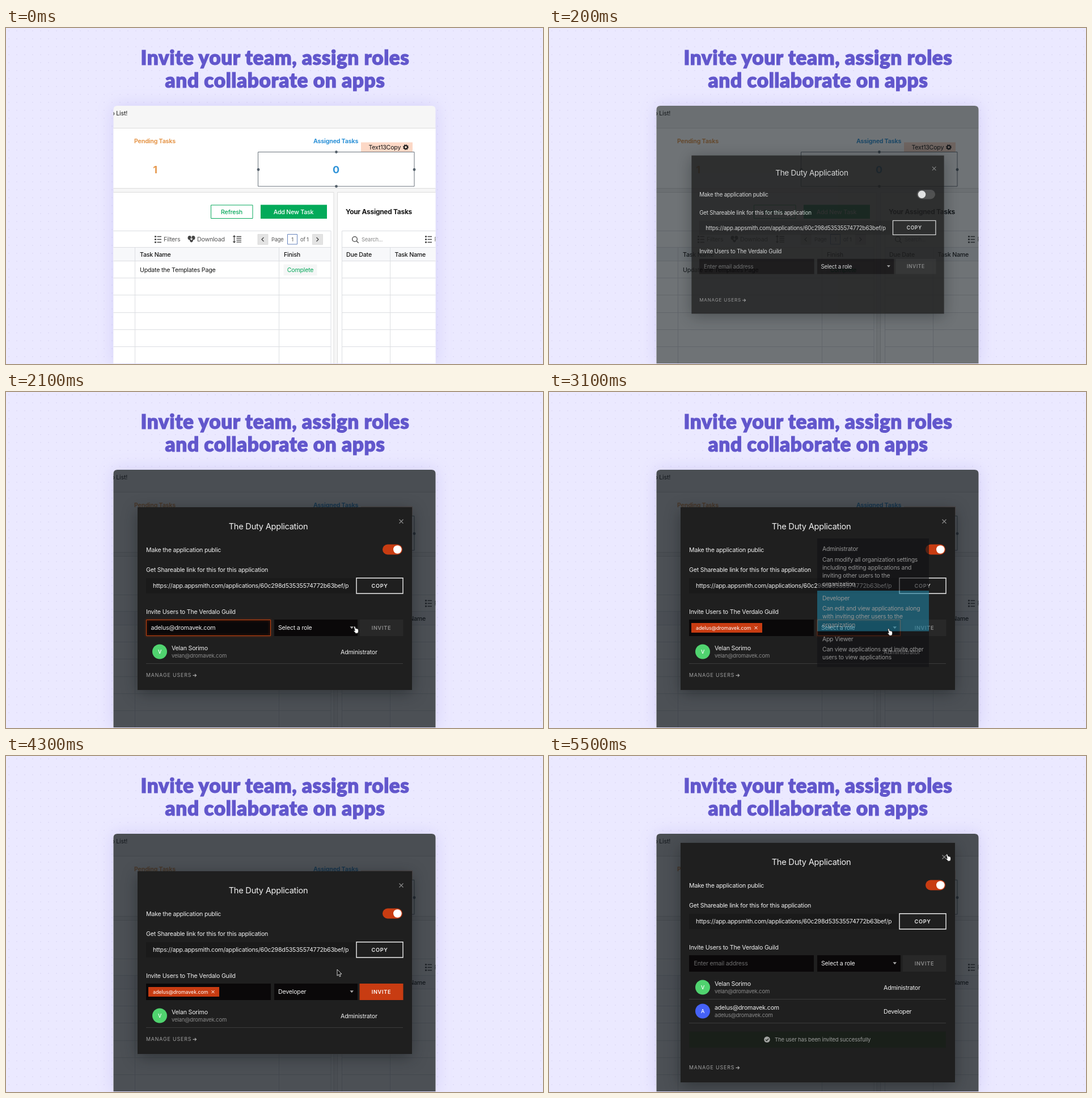
Animation of 947x592 px, one loop 6.5 s. Source, as an HTML page:

```html
<!DOCTYPE html>
<html lang="en">
<head>
<meta charset="utf-8">
<title>Invite your team</title>
<style>
  html, body { margin: 0; width: 100%; height: 100%; overflow: hidden; background: #ebe9ff; }
  svg { display: block; width: 947px; height: 592px; }
  text { font: 10.65px Inter, "Open Sans", sans-serif; letter-spacing: -.02em; fill: #161616; white-space: pre; }
  .headline { font: 900 35.2px Lato, Inter, sans-serif; letter-spacing: .015em; fill: #6257cc; stroke: #6257cc; stroke-width: 1.1; }
  .mid { text-anchor: middle; }
  .medium { font-weight: 500; }
  .semi { font-weight: 700; }
  .count { font-size: 18px; font-weight: 700; }
  .tool { fill: #555; }
  .small { font-size: 9.3px; }
  .line { fill: none; stroke: #dcdee2; }
  .icon { fill: none; stroke: #444; stroke-width: 1.3; }
  .panel { fill: #fff; stroke: #dcdcdc; }
  #dialog text { fill: #f0f0f0; }
  #dialog .title { font-size: 14.7px; }
  #dialog .mute { fill: #8b8b8b; font-size: 9.6px; }
  #dialog .hint { fill: #6c6c6c; }
  #dialog .caps { font-size: 9.2px; font-weight: 600; letter-spacing: .7px; }
  #dialog .chip { font-size: 8.8px; letter-spacing: 0; fill: #fff; }
  #dialog .avatar { font-size: 9px; font-weight: 500; fill: #fff; text-anchor: middle; }
  #dialog .manage { font-size: 8.8px; letter-spacing: .9px; fill: #a0a0a0; }
  #dialog #menu text { fill: #ddd; font-size: 10.4px; }
  .sheet { fill: #1f1f1f; filter: drop-shadow(0 6px 14px rgba(10, 14, 18, .4)); }
  .well { fill: #0a0809; }
  .rule { stroke: #3c3c3c; }
  .orange { fill: #c83c12; }
  .focus { fill: none; stroke: #c2420f; filter: drop-shadow(0 0 2px #a8380f); }
</style>
</head>
<body>
<svg viewBox="0 0 947 592">
  <defs>
    <pattern id="dots" width="14" height="14" patternUnits="userSpaceOnUse">
      <circle cx="5" cy="5" r=".9" fill="#dedaf7"/>
    </pattern>
    <path id="card" d="M189.500 591V144q0-7 7-7h554q7 0 7 7v447z"/>
    <clipPath id="window"><use href="#card"/></clipPath>
    <clipPath id="link"><path d="M247 328h360v28H247z"/></clipPath>
    <g id="filters">
      <path class="icon" d="M4.500 0H12M4.500 5H12M4.500 10H12"/>
      <path d="M0-1.200h3v2.400H0zM0 3.800h3v2.400H0zM0 8.800h3v2.400H0z" fill="#444"/>
    </g>
  </defs>

  <rect width="947" height="592" fill="#ebe9ff"/>
  <rect width="947" height="592" fill="url(#dots)"/>
  <text class="headline mid" x="474.500" y="64.500">Invite your team, assign roles</text>
  <text class="headline mid" x="474.500" y="105">and collaborate on apps</text>
  <use href="#card" fill="#f6f6f6" style="filter: drop-shadow(0 0 14px rgba(120, 105, 225, .2))"/>

  <g clip-path="url(#window)">
    <!-- Page behind the dialog -->
    <text x="214" y="154" text-anchor="end">To Do List!</text>
    <path class="panel" d="M180 176.500h590v106H180z"/>
    <path class="panel" d="M180 289.500h398v310H180zM584.500 289.500h190v310h-190z"/>

    <text class="semi" x="226" y="203" style="fill:#e6994f">Pending Tasks</text>
    <text class="count mid" x="263" y="255.500" style="fill:#e6994f">1</text>
    <text class="semi" x="542" y="203" style="fill:#2f93d8">Assigned Tasks</text>
    <text class="count mid" x="582" y="255.500" style="fill:#2f93d8">0</text>
    <path d="M626 201.500h91v17h-91z" fill="#fcd8c6"/>
    <text x="639.500" y="213.700">Text13Copy</text>
    <circle cx="705" cy="210" r="2.900" fill="none" stroke="#111" stroke-width="1.900"/>
    <circle cx="705" cy="210" r="4.300" fill="none" stroke="#111" stroke-width="1.200" stroke-dasharray="1.800 1.577"/>
    <path d="M444.500 218.500h275.500v60.500H444.500z" fill="none" stroke="#6a737c"/>
    <g fill="#56616b">
      <circle cx="582.500" cy="218.500" r="2.400"/><circle cx="582.500" cy="279" r="2.400"/>
      <circle cx="445" cy="249.500" r="2.400"/><circle cx="720" cy="249.500" r="2.400"/>
    </g>

    <path d="M361.500 312h73.500v23.500h-73.500z" fill="#fff" stroke="#08a95c"/>
    <text class="medium mid" x="398" y="327.700" style="fill:#08a95c">Refresh</text>
    <path d="M449 311.500h117v24.500H449z" fill="#03aa5a"/>
    <text class="medium mid" x="507" y="327.700" style="fill:#fff">Add New Task</text>
    <text class="semi" x="599" y="328.300" style="font-size:11.900px">Your Assigned Tasks</text>

    <path d="M189 386.500h384v24H189zM592 386.500h166v24H592z" fill="#f7f8fa"/>
    <path class="line" d="M180 357.500h393v240M592.500 600V357.500h170M180 386.500h393M592 386.500h170"/>
    <path class="line" d="M180 410.500h393m19 0h170M180 440.500h393m19 0h170M180 470.500h393m19 0h170M180 501.500h393m19 0h170M180 531.500h393m19 0h170M180 561.500h393m19 0h170"/>
    <path class="line" d="M227.500 386v210M481.500 386v210M677.500 386v210"/>

    <use href="#filters" x="262" y="367.500"/>
    <text class="tool" x="278" y="376">Filters</text>
    <path d="M320.500 370q0-4 3.500-4 2.500 0 2.500 2v3h-2l2.500 3 2.500-3h-2v-3q0-2 2.500-2 3.500 0 3.500 4 0 3-3.500 3.500-.5 4-3 4t-3-4q-3.500-.5-3.500-3.500z" fill="#444"/>
    <text class="tool" x="337" y="376">Download</text>
    <path class="icon" d="M406.500 367.500h8.500m-8.500 3.200h8.500m-8.500 3.200h8.500m-8.500 3.200h8.500M402.500 366v12m-2-10 2-2 2 2m-4 8 2 2 2-2" stroke-width="1.100"/>
    <path d="M444 363.500h18v18h-18zM540.500 363.500h18v18h-18z" fill="#e3e3e3" stroke="#d2d2d2" stroke-width=".6"/>
    <path class="icon" d="m454.500 369-3.500 3.500 3.500 3.500M547.500 369l3.500 3.500-3.500 3.500"/>
    <text class="tool small" x="468" y="375.700">Page</text>
    <path d="M496.500 363.500h17v17.500h-17z" fill="#fff" stroke="#6684bd"/>
    <text class="tool small mid" x="505" y="375.700">1</text>
    <text class="tool small" x="519" y="375.700">of 1</text>
    <circle class="icon" cx="615" cy="372" r="4.300"/><path class="icon" d="m618.200 375.200 3.500 3.500"/>
    <text class="small" x="627" y="376" style="fill:#888">Search...</text>
    <use href="#filters" x="739" y="367.500"/>
    <text class="tool" x="755.500" y="376">Filters</text>

    <text class="medium" x="236" y="402.600">Task Name</text>
    <text class="medium" x="490" y="402.600">Finish</text>
    <text class="medium" x="600" y="402.600">Due Date</text>
    <text class="medium" x="685.500" y="402.600">Task Name</text>
    <text x="236" y="430">Update the Templates Page</text>
    <path d="M489.500 416.500h59v19.500h-59z" fill="#f5f6f6"/>
    <text class="mid" x="519" y="430" style="fill:#08a95c">Complete</text>

    <rect id="backdrop" x="189" y="136" width="570" height="456" fill="rgb(16 22 28 / .75)"/>

    <g id="dialog">
      <rect id="sheet" class="sheet" x="232" y="203" width="484"/>
      <text class="title mid" x="462.500" y="241.500">The Duty Application</text>
      <path d="m693.500 224.500 7 7m0-7-7 7" stroke="#8a8a8a" stroke-width="1.200"/>
      <text x="247" y="281.800">Make the application public</text>
      <rect id="toggle" x="664" y="268.500" width="35" height="18" rx="9"/>
      <circle id="knob" cy="277.500" r="7.300" fill="#fff"/>

      <text x="247" y="316.500">Get Shareable link for this for this application</text>
      <path d="M247 328h370v27H247z" fill="#1a1a1a"/>
      <g clip-path="url(#link)">
        <text x="259" y="345.300">https://app.appsmith.com/applications/60c298d53535574772b63bef/p</text>
      </g>
      <path d="M618 327.700h82v27.300h-82z" fill="#1f1f1f" stroke="#eee" stroke-width="1.400"/>
      <text class="caps mid" x="659" y="344.500">COPY</text>

      <text x="247" y="390.600">Invite Users to The Verdalo Guild</text>
      <path class="well" d="M247 401h220v29H247zM473 401h147v29H473z"/>
      <path id="focus" class="focus" d="M247.500 401.500h219v28h-219z"/>
      <text id="hint" class="hint" x="255.500" y="419.300">Enter email address</text>
      <text id="typed" x="255.500" y="419.300"></text>
      <rect id="caret" y="409" width="1" height="13" fill="#eee"/>
      <g id="chip">
        <path class="orange" d="M251 407h125v17H251z"/>
        <text class="chip" x="259" y="418.600">adelus@dromavek.com</text>
        <path d="m362.500 413 5 5m0-5-5 5" stroke="#fff"/>
      </g>
      <path id="roleFocus" class="focus" d="M473.500 401.500h146v28h-146z"/>
      <text id="role" x="480" y="419.300"></text>
      <path d="M606.500 413.300h6.500l-3.250 4z" fill="#aaa"/>
      <path id="inviteBox" d="M623.500 401h77v29h-77z"/>
      <text id="invite" class="caps mid" x="662" y="418.700">INVITE</text>

      <g id="owner">
        <circle cx="271" cy="457.500" r="13" fill="#50d36f"/>
        <text class="avatar" x="271" y="460.800">V</text>
        <text x="292" y="455">Velan Sorimo</text>
        <text class="mute" x="292" y="468.300">velan@dromavek.com</text>
        <text x="590" y="461.800">Administrator</text>
        <path class="rule" d="M247 478.500h453"/>
      </g>
      <g id="guest">
        <circle cx="271" cy="499.500" r="13" fill="#4562f7"/>
        <text class="avatar" x="271" y="502.800">A</text>
        <text x="292" y="496.500">adelus@dromavek.com</text>
        <text class="mute" x="292" y="510">adelus@dromavek.com</text>
        <text x="590" y="503.500">Developer</text>
        <path class="rule" d="M247 520.500h453"/>
      </g>
      <g id="success">
        <path d="M247 535.500h453v28.500H247z" fill="#191f19"/>
        <circle cx="384.500" cy="549.500" r="5.300" fill="#a3a5a3"/>
        <path d="m382 549.700 1.900 1.900 3.300-3.700" fill="none" stroke="#191f19" stroke-width="1.300"/>
        <text class="mute" x="398" y="553.200" style="fill:#9b9d9b">The user has been invited successfully</text>
      </g>
      <g id="manage">
        <text class="manage" x="247" y="502.300">MANAGE USERS</text>
        <path d="M329.500 499.300h6m-2.500-2.500 2.500 2.500-2.500 2.500" fill="none" stroke="#a8a8a8" stroke-width="1.200"/>
      </g>

      <g id="menu">
        <path d="M473 258h197v226.500H473z" fill="#111114"/>
        <path d="M473 350h197v71.500H473z" fill="#1f7d9b"/>
        <text x="482" y="280.200">Administrator</text>
        <text x="482" y="298.600">Can modify all organization settings<tspan x="482" dy="14.400">including editing applications and</tspan><tspan x="482" dy="14.400">inviting other users to the</tspan><tspan x="482" dy="14.400">organization</tspan></text>
        <text x="482" y="366.700">Developer</text>
        <text x="482" y="384.800">Can edit and view applications along<tspan x="482" dy="14.400">with inviting other users to the</tspan><tspan x="482" dy="14.400">organization</tspan></text>
        <text x="482" y="438.600">App Viewer</text>
        <text x="482" y="456.700">Can view applications and invite other<tspan x="482" dy="14.400">users to view applications</tspan></text>
      </g>
    </g>
  </g>

  <path id="hand" d="M-3-6q1.300-.6 1.900.8l.9 3q.8-.6 1.500.2.900-.5 1.500.4 1-.2 1.300.8l.5 2.500q.2 1.500-.6 2.800l.1 1.300-4.600.6-.6-1.300q-1.600-1.200-2.900-3 .1-1.100 1.400-.6l.9.5-1.700-6.600q-.3-1 .4-1.400z" fill="#fff" stroke="#111" stroke-width=".8"/>
  <path id="arrow" d="M0 0V11.200L2.600 8.800 4.400 12.800 6.200 12 4.500 8.100H8z" fill="#111" stroke="#fff" stroke-width=".8"/>
</svg>

<script>
  const LOOP = 6500;
  const EMAIL = "adelus@dromavek.com";
  const BASE = 322; // dialog height the markup is laid out for

  // Each track is a list of [ms, value...]; a value holds until the next entry.
  const tracks = {
    backdrop: [[0, 0], [100, .19], [200, .8], [300, 1]],
    dialog: [[0, 0, 1], [100, .15, .558], [200, .8, .92], [300, 1, 1]],
    height: [[0, 303], [300, BASE], [4700, 364], [4800, 422]],
    knob: [[0, 673.5], [600, 682], [700, 690.3]],
    letters: [[0, 0], [900, 1], [1000, 2], [1200, 3], [1300, 4], [1500, 6],
      [1600, 9], [1700, 12], [1800, 16], [1900, 19], [3100, 0]],
    menu: [[0, 0], [3100, .62], [3200, 1], [4300, 0]],
    cursor: [[0, ""], [2000, "arrow", 570, 424], [2100, "hand", 617, 419], [3100, "hand", 601, 423],
      [3300, "hand", 587, 383], [4300, "arrow", 584, 376], [4400, "arrow", 618, 396],
      [4500, "hand", 662, 420], [4700, "arrow", 660, 414], [5300, "arrow", 668, 340],
      [5400, "arrow", 690, 230], [5500, "hand", 704, 179]]
  };

  const $ = id => document.getElementById(id);
  const show = (id, on) => $(id).style.display = on ? "" : "none";
  const fill = (id, color) => $(id).style.fill = color;
  const at = (name, t) => tracks[name].findLast(step => step[0] <= t).slice(1);

  function draw(t) {
    const between = (from, to) => t >= from && t < to;
    const [height] = at("height", t);
    const [opacity, scale] = at("dialog", t);
    const [knob] = at("knob", t);
    const [letters] = at("letters", t);
    const [menu] = at("menu", t);
    const [pointer, x, y] = at("cursor", t);
    const grow = height - BASE;

    $("backdrop").style.opacity = at("backdrop", t)[0];
    $("dialog").style.opacity = opacity;
    $("dialog").setAttribute("transform",
      `translate(474 364) scale(${scale}) translate(-474 ${-364 - grow / 2})`);
    $("sheet").setAttribute("height", height);
    $("manage").setAttribute("transform", `translate(0 ${grow})`);
    show("owner", t >= 300);
    show("guest", t >= 4700);
    show("success", t >= 4800);

    $("knob").setAttribute("cx", knob);
    fill("toggle", t < 600 ? "#4a4a4a" : "#c83c12");

    show("focus", between(800, 3100));
    show("chip", between(3100, 4700));
    show("hint", !letters && !between(3100, 4700));
    $("typed").textContent = EMAIL.slice(0, letters);
    show("caret", between(800, 2000));
    $("caret").setAttribute("x", 256 + (letters && $("typed").getComputedTextLength()));

    const chosen = between(4300, 4700);
    $("role").textContent = chosen ? "Developer" : "Select a role";
    show("roleFocus", between(3100, 4300));
    fill("inviteBox", chosen ? "#c83c12" : "#282828");
    fill("invite", chosen ? "#fff" : "#8e8e8e");
    $("menu").style.opacity = menu;

    for (const id of ["hand", "arrow"]) show(id, id === pointer);
    if (pointer) $(pointer).setAttribute("transform", `translate(${x} ${y})`);
  }

  const start = performance.now();
  function tick() {
    draw((performance.now() - start) % LOOP);
    requestAnimationFrame(tick);
  }
  tick();
</script>
</body>
</html>
```
